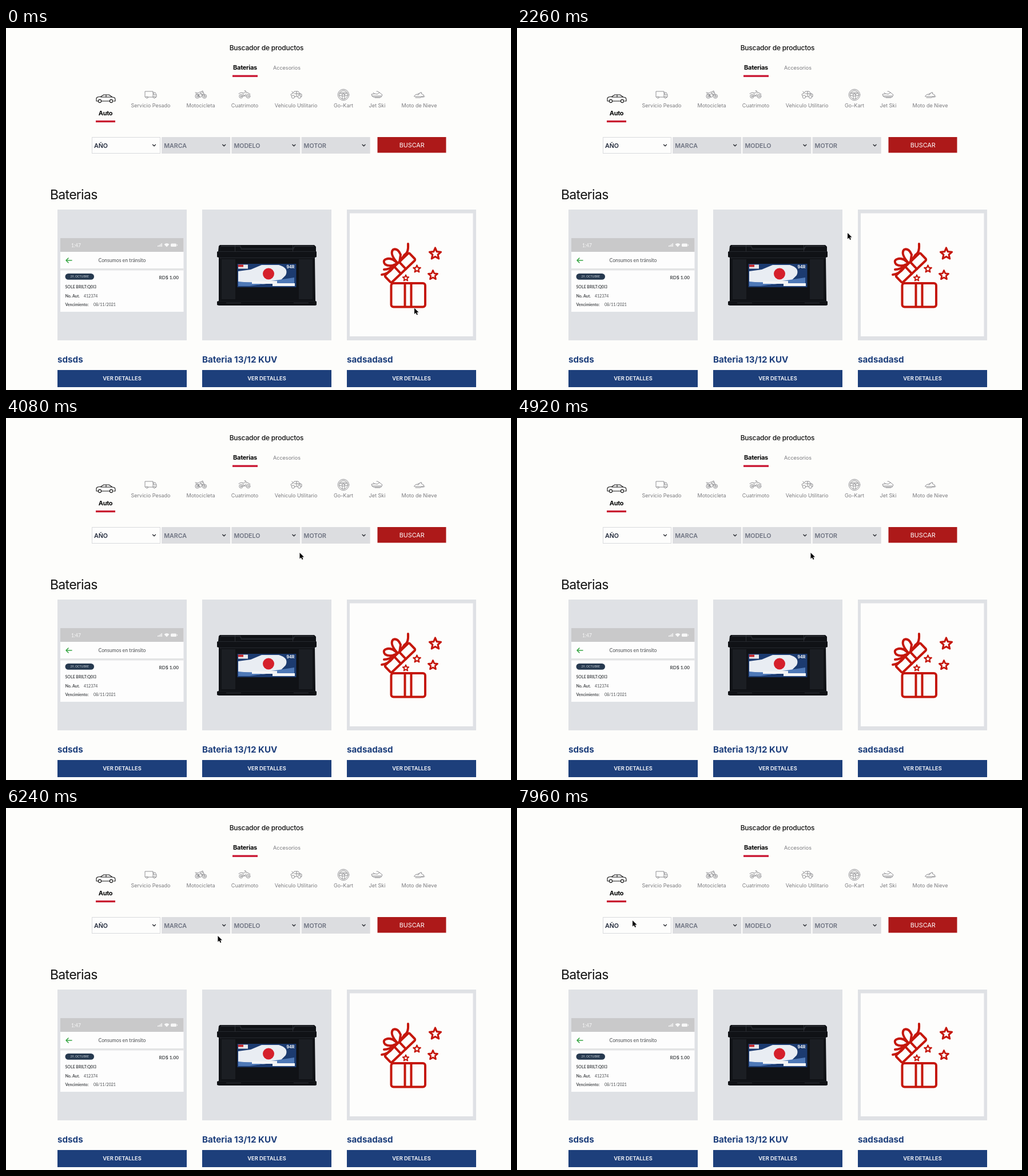
An HTML page for the animation above (8 s loop, 883 by 634 pixels).

```html
<!DOCTYPE html>
<html lang="es">
<head>
<meta charset="utf-8">
<title>Buscador de productos</title>
<style>
html, body { margin: 0; width: 100%; height: 100%; overflow: hidden; background: #fdfdfb; }
svg { display: block; }
text { font-family: Inter, "Open Sans", sans-serif; }
.mid { text-anchor: middle; }
.end { text-anchor: end; }
.title { font-size: 12px; font-weight: 500; letter-spacing: -.2px; fill: #111; }
.tab { font-size: 11px; font-weight: 700; letter-spacing: -.3px; fill: #080808; }
.kind { font-size: 9.05px; fill: #7b7b7f; }
.field { font-size: 10.65px; font-weight: 600; }
.head { font-size: 23px; letter-spacing: -.7px; fill: #111; }
.name { font-size: 15.2px; font-weight: 700; fill: #1d3f7c; }
.btn { font-size: 9.3px; font-weight: 600; fill: #fff; }
.phone text { font-family: Lato, "Open Sans", sans-serif; font-size: 7px; fill: #4a4d50; }
.phone .b { font-weight: 700; }
.line { fill: none; stroke-linecap: round; stroke-linejoin: round; }
</style>
</head>
<body>
<svg id="stage" width="883" height="634" viewBox="0 0 883 634">
  <text class="title mid" x="455.5" y="39">Buscador de productos</text>
  <text class="tab mid" x="418" y="73">Baterias</text>
  <text class="kind mid" x="491" y="72.5">Accesorios</text>
  <path fill="#c8102e" d="M396 82.5h44v3.3h-44zM157 162h34v3.3h-34z"/>
  <text class="tab mid" x="174" y="153">Auto</text>

  <g class="line" stroke="#161616" stroke-width="1.1">
    <path d="M161 128h-3v-5l2-2 6-1 5-3h9l6 4 4 1 1 3v3h-3M167 128h14M166 121h20M175 117v4"/>
    <circle cx="164" cy="128" r="2.6"/><circle cx="184" cy="128" r="2.6"/>
  </g>
  <g class="line" stroke="#85858a" stroke-width=".9">
    <path d="M245 121h-2v-10h14v10h-9M257 113h4l2 4v4h-2M258 121h-1M258.500 114.500v2.500h4"/>
    <circle cx="246.500" cy="121.500" r="1.600"/><circle cx="259.500" cy="121.500" r="1.600"/>

    <circle cx="334.500" cy="119.500" r="3.600"/><circle cx="334.500" cy="119.500" r="1.500"/>
    <circle cx="347" cy="119.500" r="3.600"/><circle cx="347" cy="119.500" r="1.500"/>
    <path d="M331 113l5 1 3-2h4l2 2M342 111l2-1 3 9M335 119l4-4 5 1-3 5h-3l-2-4M340 113l3 5M332 115l5 2"/>

    <circle cx="411" cy="119.500" r="3.300"/><circle cx="423.500" cy="119.500" r="3.300"/>
    <circle cx="411" cy="119.500" r="1.200"/><circle cx="423.500" cy="119.500" r="1.200"/>
    <path d="M407 115l4-2 5 1 3-2 5 2 3 2M418 110l3 3M414 119h6M414 115l3 4 3-4M419 110h-2"/>

    <circle cx="502" cy="120.500" r="2.700"/><circle cx="513" cy="120.500" r="2.700"/>
    <path d="M499 119l-1-3 4-2 2-3h7l3 4 3 1v4h-1M505 120h5M504 115h10M508 111v8M502 114l-2-3M511 116h4"/>

    <circle cx="590" cy="117" r="9.700"/><circle cx="590" cy="117" r="7.500"/><circle cx="590" cy="117" r="2.300"/>
    <path d="M583 114l5 1.500h4l5-1.500M583 118l5 1v5M597 118l-5 1v5M585 113h10"/>

    <path d="M640 119l-1-3 6-1 4 1 4-3-3-2h-2M653 113l5 4-2 4h-14l-2-2h16M644 115l-2-2M645 122h9"/>
    <path d="M714 119l3-3 4 1 3-4h3l-1 2 4 2 1 2-3 1h-14zM716 122h9l2-2M727 121h3l2-1M720 115h3"/>
  </g>
  <g id="kinds"></g>
  <g id="fields"></g>
  <path fill="#ad1919" d="M649.500 191h120v27.500h-120z"/>
  <text class="mid" x="709.700" y="209" font-size="10.800" fill="#fff">BUSCAR</text>

  <text class="head" x="77" y="300">Baterias</text>
  <g id="cards"></g>

  <g class="phone">
    <path fill="#fdfdfd" d="M95 368h215.500v129H95z"/>
    <path fill="#c9c9ca" d="M95 368h215.500v24H95z"/>
    <path fill="#e3e4e5" d="M95 421h215.500v3.500H95z"/>
    <text x="114" y="383.500" style="font-size:8.500px;fill:#f7f7f7">1:47</text>
    <g fill="#f7f7f7">
      <path d="M265 381h1.300v2H265zM267.200 380h1.300v3h-1.300zM269.400 378.500h1.300v4.500h-1.300zM271.600 377h1.300v6h-1.300z"/>
      <path d="M276.500 379q4.500-4 9 0l-4.500 4.500z"/><rect x="288" y="377.500" width="10" height="5.500" rx="1.500"/><path d="M299 379h1v2.500h-1z"/>
    </g>
    <path class="line" stroke="#39a745" stroke-width="1.600" d="M115 407h-10M109 403l-4 4 4 4"/>
    <text class="mid" x="203" y="410" style="font-size:8.700px">Consumos en tránsito</text>
    <rect x="103.500" y="430" width="50.500" height="10.800" rx="5.400" fill="#273a50"/>
    <text class="mid" x="128.700" y="437.300" style="font-size:5.200px;fill:#c3ccd5">29, OCTUBRE</text>
    <text class="b end" x="302" y="440" style="font-size:8.200px">RD$ 1.00</text>
    <text class="b" x="103.500" y="456">SOLE BRILT:Q0I3</text>
    <text class="b" x="103.500" y="471.500">No. Aut.</text><text x="136" y="471.500">412374</text>
    <text class="b" x="103.500" y="487">Vencimiento:</text><text x="153" y="487">08/11/2021</text>
  </g>

  <g>
    <path fill="#101216" d="M374 380h165l3 3v8l1 1v9l-3 1 1 76 2 1v6l-2 1H372l-3-1v-6l3-1V402l-3-1v-9l2-1 1-9z"/>
    <path fill="#25282e" d="M376 381h34l2 5h90l2-5h34v2h-33l-2 5h-92l-2-5h-33zM371 391h170v1H371zM373 402h167v1H373z"/>
    <path fill="#1b1e23" d="M377 405h24v70h-24zM512 405h24v70h-24zM372 478h169v1H372z"/>
    <path fill="#2d3036" d="M400 380h1v11h-1zM501 380h1v11h-1zM385 481h26v1h-26zM503 481h26v1h-26z"/>
    <path fill="#1c3b70" d="M404.500 413h103v41h-103z"/>
    <path fill="#e9edf3" d="M406 426l22-3 19-8h30q18 5 12 18l-13 13-52 5h-18z"/>
    <path fill="#4f79b7" d="M406 444q22 3 58-1l40-6v14l-38-5-40 6h-20z"/>
    <path fill="#f3f4f6" d="M430 443h44v5h-44zM466 447h39v5h-39z"/>
    <path fill="#e9e9eb" d="M406 414.500h17v7h-17z"/><path fill="#c4272c" d="M406 414.500h9v4h-9z"/>
    <circle cx="459" cy="430.500" r="10" fill="#d51f2b"/>
    <text x="490.500" y="421" font-size="7" font-weight="700" fill="#fff">94R</text>
  </g>

  <path fill="#fdfdfc" d="M601 324.500h215.500V540H601z"/>
  <g class="line" stroke="#c5170c" stroke-width="4">
    <rect x="673.500" y="447" width="59.500" height="41.500" rx="4"/>
    <path d="M697.500 447v41M708.500 447v41"/>
    <g transform="translate(689 420) rotate(-43.600)">
      <rect x="-29.500" y="-8.500" width="59" height="17" rx="2.500"/>
      <path d="M-6-8.500v17M6-8.500v17"/>
    </g>
    <path d="M684 411q-14-16-7-23 8-3 13 9l-2 13 9-13q7-3 6-19M683 411q-9-10-19-6-6 3-1 9 8 5 20-1M681 414q-10 9-20 9M676 421q-8 10-19 11"/>
  </g>
  <g id="stars" class="line" stroke="#c5170c"></g>

  <path id="cursor" d="M0 0V10.500L2.500 8.200L4.200 12L6 11.200L4.300 7.500H7.600Z" fill="#080808" stroke="#fff" stroke-width=".8" paint-order="stroke"/>
</svg>
<script>
const put = (id, items, draw) => {
  document.getElementById(id).innerHTML = items.map(draw).join('');
};

put('kinds', [
  ['Servicio Pesado', 253], ['Motocicleta', 340.5], ['Cuatrimoto', 417.5],
  ['Vehiculo Utilitario', 507], ['Go-Kart', 590], ['Jet Ski', 649], ['Moto de Nieve', 722.5]
], ([label, x]) => `<text class="kind mid" x="${x}" y="138.5">${label}</text>`);

put('fields', ['AÑO', 'MARCA', 'MODELO', 'MOTOR'], (label, i) => {
  const x = 150 + i * 122.2;
  const [fill, edge, ink] = i ? ['#dcdde0', '#dcdde0', '#6d7280'] : ['#fdfdfc', '#d9dadd', '#20283a'];
  return `<rect x="${x + .5}" y="191.5" width="119" height="28" fill="${fill}" stroke="${edge}"/>
    <text class="field" x="${x + 4}" y="209.5" fill="${ink}">${label}</text>
    <path class="line" stroke="#25282e" stroke-width="1.3" d="M${x + 106.5} 204.300l2.500 2.500 2.500-2.500"/>`;
});

put('cards', ['sdsds', 'Bateria 13/12 KUV', 'sadsadasd'], (name, i) => {
  const x = 90 + i * 253;
  return `<rect x="${x}" y="318" width="226" height="229" fill="#dfe1e5"/>
    <text class="name" x="${x}" y="586">${name}</text>
    <rect x="${x}" y="599" width="226" height="30" fill="#1d3f7b"/>
    <text class="btn mid" x="${x + 113}" y="617.3">VER DETALLES</text>`;
});

const star = (cx, cy, r) => Array.from({ length: 10 }, (_, i) => {
  const a = i * Math.PI / 5 - Math.PI / 2, d = i % 2 ? r * .46 : r;
  return `${(cx + d * Math.cos(a)).toFixed(1)},${(cy + d * Math.sin(a)).toFixed(1)}`;
}).join(' ');

put('stars', [[750.5, 395.5, 10.5, 3.2], [746.5, 433, 8.5, 2.8], [718.5, 422, 6.5, 2.3], [699, 438, 5.5, 2]],
  ([x, y, r, w]) => `<polygon points="${star(x, y, r)}" stroke-width="${w}"/>`);

// time, x, y of the pointer tip
const LOOP = 8000;
const path = [
  [0, 714, 490.5], [860, 714, 490.5], [1380, 654, 426], [2260, 578, 359], [2360, 578, 359],
  [3240, 513.5, 236], [5020, 513.5, 236], [6240, 370.5, 224], [7960, 202, 197], [LOOP, 202, 197]
];
const cursor = document.getElementById('cursor');
const start = performance.now();

function frame() {
  const t = (performance.now() - start) % LOOP;
  const i = path.findIndex(p => p[0] > t);
  const [t0, x0, y0] = path[i - 1], [t1, x1, y1] = path[i];
  const k = (t - t0) / (t1 - t0);
  cursor.setAttribute('transform', `translate(${x0 + (x1 - x0) * k} ${y0 + (y1 - y0) * k})`);
  requestAnimationFrame(frame);
}
frame();
</script>
</body>
</html>
```
